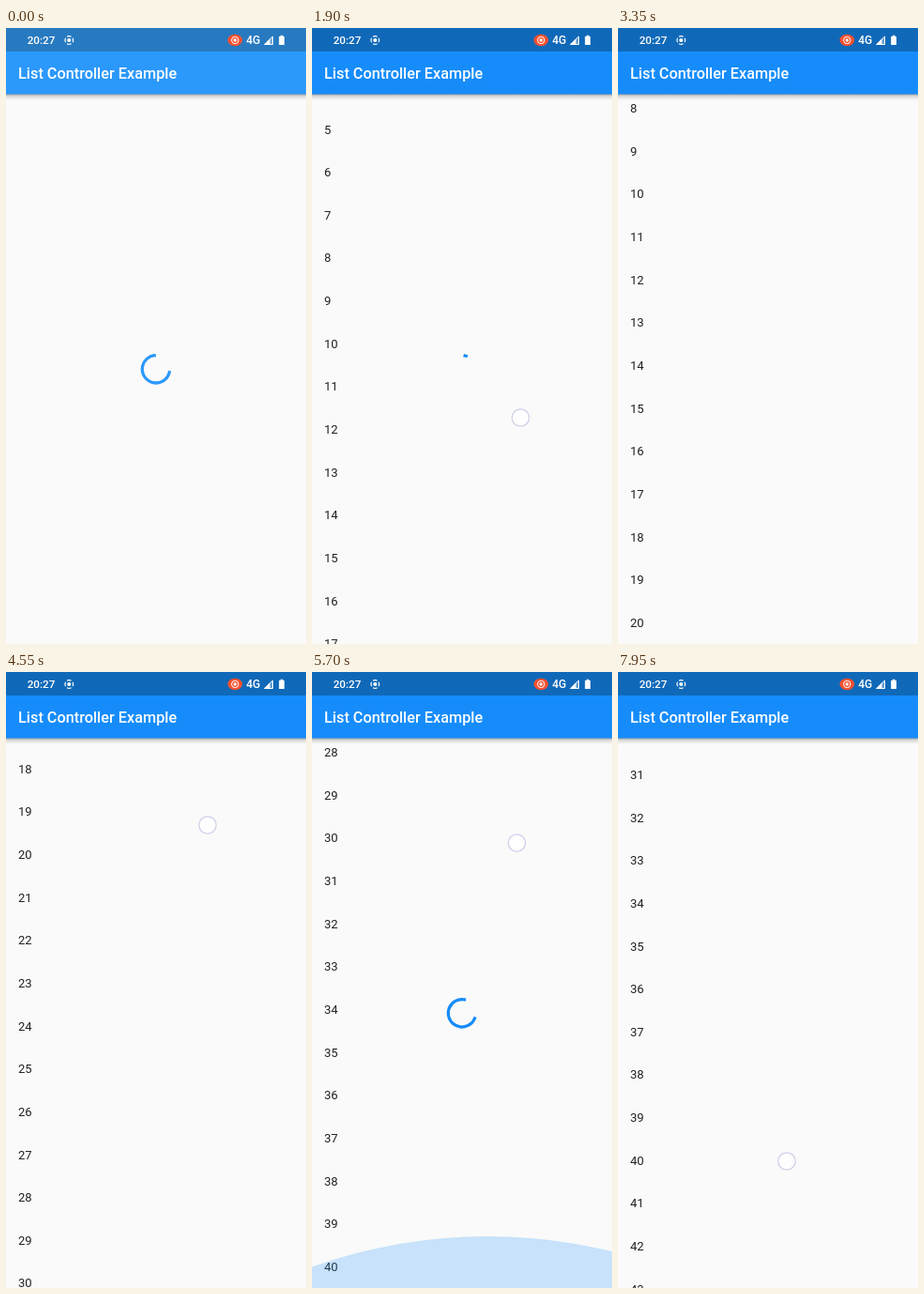
An HTML page with a canvas for the animation above (8 s loop, 320 px wide and 656 px high).

```html
<!DOCTYPE html>
<html lang="en">
<head>
<meta charset="utf-8">
<title>List Controller Example</title>
<style>
html, body { margin: 0; width: 100%; height: 100%; overflow: hidden; background: #fafafa; }
canvas { display: block; width: 320px; height: 656px; }
</style>
</head>
<body>
<canvas id="stage"></canvas>
<script>
const W = 320, H = 656, LOOP = 8000, STEP = 50;
const DP = W / 392.7;
const BAR_TOP = 25, LIST_TOP = 71, ROW = 56 * DP;
const TAU = Math.PI * 2;

const canvas = document.getElementById('stage');
const ratio = window.devicePixelRatio || 1;
canvas.width = W * ratio;
canvas.height = H * ratio;
const ctx = canvas.getContext('2d');

const maxScroll = count => LIST_TOP + count * ROW - H;
const END_1 = maxScroll(21), END_2 = maxScroll(41);

// Each load runs from start to end and leaves `count` rows in the list.
const loads = [
  { start: -450, end: 1050, count: 21 },
  { start: 1845, end: 3345, count: 41 },
  { start: 5210, end: 6710, count: 61 }
];

const scrollKeys = [
  [1650, 0], [1700, 8], [1900, 214], [2000, 320], [2060, END_1],
  [3950, END_1], [4050, 400], [4550, 812], [4600, 850], [4700, 925],
  [4850, 1005], [5000, 1045], [5130, 1056], [5210, 1123], [5370, END_2],
  [7750, END_2], [7790, END_2 + 5], [7950, 1399]
];

// Finger paths: time, x, y
const touches = [
  [[1650, 195, 640], [1700, 205, 621], [1900, 222.5, 415], [2000, 222, 309]],
  [[3950, 190, 617], [4050, 198, 575], [4550, 215, 163], [4600, 214, 125]],
  [[5100, 188, 628], [5130, 192, 610], [5210, 203, 543], [5370, 219, 380], [5700, 218.5, 182], [5850, 217, 165]],
  [[7750, 172, 649], [7790, 174, 629], [7950, 180, 521]]
];

const clamp = (v, lo = 0, hi = 1) => Math.min(hi, Math.max(lo, v));
const mix = (a, b, k) => a + (b - a) * k;

function track(keys, t, field = 1) {
  if (t <= keys[0][0]) return keys[0][field];
  for (let i = 1; i < keys.length; i++) {
    const a = keys[i - 1], b = keys[i];
    if (t <= b[0]) return mix(a[field], b[field], (t - a[0]) / (b[0] - a[0]));
  }
  return keys[keys.length - 1][field];
}

// cubic-bezier(0.4, 0, 0.2, 1)
function fastOutSlowIn(x) {
  if (x <= 0) return 0;
  if (x >= 1) return 1;
  let lo = 0, hi = 1, s;
  for (let i = 0; i < 24; i++) {
    s = (lo + hi) / 2;
    const bx = 1.2 * s * (1 - s) ** 2 + 0.6 * s * s * (1 - s) + s ** 3;
    if (bx < x) lo = s; else hi = s;
  }
  return 3 * s * s * (1 - s) + s ** 3;
}

function blend(from, to, k) {
  return `rgb(${from.map((v, i) => Math.round(mix(v, to[i], k))).join()})`;
}

function label(text, x, y, font, color = '#fff') {
  ctx.font = font + ' Roboto, sans-serif';
  ctx.fillStyle = color;
  ctx.fillText(text, x, y);
}

function disc(x, y, r, color) {
  ctx.beginPath();
  ctx.arc(x, y, r, 0, TAU);
  ctx.fillStyle = color;
  ctx.fill();
}

function polygon(color, ...points) {
  ctx.beginPath();
  points.forEach(([x, y]) => ctx.lineTo(x, y));
  ctx.closePath();
  ctx.fillStyle = color;
  ctx.fill();
}

function drawList(t) {
  const count = loads.reduce((n, load) => t >= load.end ? load.count : n, 0);
  const scroll = track(scrollKeys, t);
  const first = Math.max(0, Math.floor(scroll / ROW));
  for (let i = first; i < count; i++) {
    const y = LIST_TOP + (i + 0.5) * ROW - scroll;
    if (y > H + 10) break;
    label(String(i), 13, y + 4.6, '13.04px', '#212121');
  }
}

function drawGlow(size, opacity, shift) {
  const radius = W * 1.5, height = W * 0.75 * (2 - Math.sqrt(3));
  ctx.save();
  ctx.translate(0, H);
  ctx.scale(1, -size);
  ctx.beginPath();
  ctx.rect(0, 0, W, height);
  ctx.clip();
  disc(W / 2 * (0.5 + shift), height - radius, radius, `rgba(22,140,251,${opacity})`);
  ctx.restore();
}

function drawGlows(t) {
  const impact = t - 2060;
  if (impact >= 0 && impact < 620) {
    const left = (1 - clamp((impact - 20) / 600)) ** 2;
    drawGlow(left, 0.3 * left, 0.59);
  }
  const pull = t - 5370;
  if (pull > 0 && t < 6450) {
    const k = clamp(pull / 330);
    const left = (1 - clamp((t - 5850) / 600)) ** 2;
    const size = Math.max(0, 1 - 1 / (0.7 * Math.sqrt(97 * k)));
    drawGlow(size * left, 0.22 * k * left, mix(0.5, 0.67, k));
  }
}

function drawSpinner(t, color) {
  const load = loads.find(l => t >= l.start && t < l.end);
  if (!load) return;
  const age = t - load.start;
  const phase = age / 1333 % 1;
  const head = fastOutSlowIn(phase * 2), tail = fastOutSlowIn(phase * 2 - 1);
  const start = -Math.PI / 2 + TAU * (tail * 0.75 + age / 2222 + phase * 0.25);
  const sweep = Math.max((head - tail) * TAU * 0.75, 0.001);
  ctx.beginPath();
  ctx.arc(160, 363.3, 18 * DP, start, start + sweep);
  ctx.lineWidth = 4 * DP;
  ctx.lineCap = 'square';
  ctx.strokeStyle = color;
  ctx.stroke();
  ctx.lineCap = 'butt';
}

function drawRecorder(x, y) {
  disc(x, y, 2.1, '#fff');
  ctx.strokeStyle = '#fff';
  ctx.lineWidth = 1.2;
  for (let i = 0; i < 4; i++) {
    const a = i * TAU / 4 - 0.55;
    ctx.beginPath();
    ctx.arc(x, y, 4.4, a, a + 1.1);
    ctx.stroke();
  }
}

function drawHeader(barColor, statusColor) {
  const shade = ctx.createLinearGradient(0, LIST_TOP - 1, 0, LIST_TOP + 6);
  shade.addColorStop(0, 'rgba(0,0,0,.38)');
  shade.addColorStop(0.4, 'rgba(0,0,0,.13)');
  shade.addColorStop(1, 'rgba(0,0,0,0)');
  ctx.fillStyle = shade;
  ctx.fillRect(0, LIST_TOP - 1, W, 7);
  ctx.fillStyle = barColor;
  ctx.fillRect(0, BAR_TOP, W, LIST_TOP - 0.5 - BAR_TOP);
  ctx.fillStyle = statusColor;
  ctx.fillRect(0, 0, W, BAR_TOP);

  label('List Controller Example', 13, 53.8, '500 16.3px');
  label('20:27', 22.7, 17, '500 11.7px');
  drawRecorder(67.3, 13);

  ctx.beginPath();
  ctx.ellipse(244.3, 13, 7.8, 6.2, 0, 0, TAU);
  ctx.fillStyle = '#f4502f';
  ctx.fill();
  disc(244.3, 13, 1.7, '#fff');
  ctx.beginPath();
  ctx.arc(244.3, 13, 3.7, 0, TAU);
  ctx.lineWidth = 1;
  ctx.strokeStyle = '#fff';
  ctx.stroke();

  label('4G', 256.3, 17.2, '500 12px');
  polygon('rgba(255,255,255,.35)', [275, 18], [285, 8], [285, 18]);
  polygon('#fff', [275, 18], [281.5, 11.5], [281.5, 18]);
  ctx.beginPath();
  ctx.moveTo(276, 17.5);
  ctx.lineTo(284.5, 9);
  ctx.lineTo(284.5, 17.5);
  ctx.closePath();
  ctx.stroke();

  ctx.fillStyle = '#fff';
  ctx.fillRect(292.7, 7.8, 2.8, 1.5);
  ctx.fillRect(291.2, 9, 5.8, 9);
}

function drawTouch(t) {
  const path = touches.find(p => t >= p[0][0] && t <= p[p.length - 1][0]);
  if (!path) return;
  const x = track(path, t, 1), y = track(path, t, 2);
  disc(x, y, 9.2, 'rgba(255,255,255,.7)');
  ctx.beginPath();
  ctx.arc(x, y, 9.2, 0, TAU);
  ctx.lineWidth = 1.3;
  ctx.strokeStyle = '#cdd0e8';
  ctx.stroke();
}

function draw(t) {
  const settle = clamp(t / 300);
  const blue = blend([43, 152, 251], [22, 140, 251], settle);
  const status = blend([40, 122, 192], [16, 105, 184], settle);
  ctx.setTransform(ratio, 0, 0, ratio, 0, 0);
  ctx.fillStyle = '#fafafa';
  ctx.fillRect(0, 0, W, H);
  drawList(t);
  drawGlows(t);
  drawSpinner(t, blue);
  drawHeader(blue, status);
  drawTouch(t);
}

const began = performance.now();
function frame() {
  const t = (performance.now() - began) % LOOP;
  draw(Math.floor(t / STEP) * STEP);
  requestAnimationFrame(frame);
}
frame();
</script>
</body>
</html>
```
